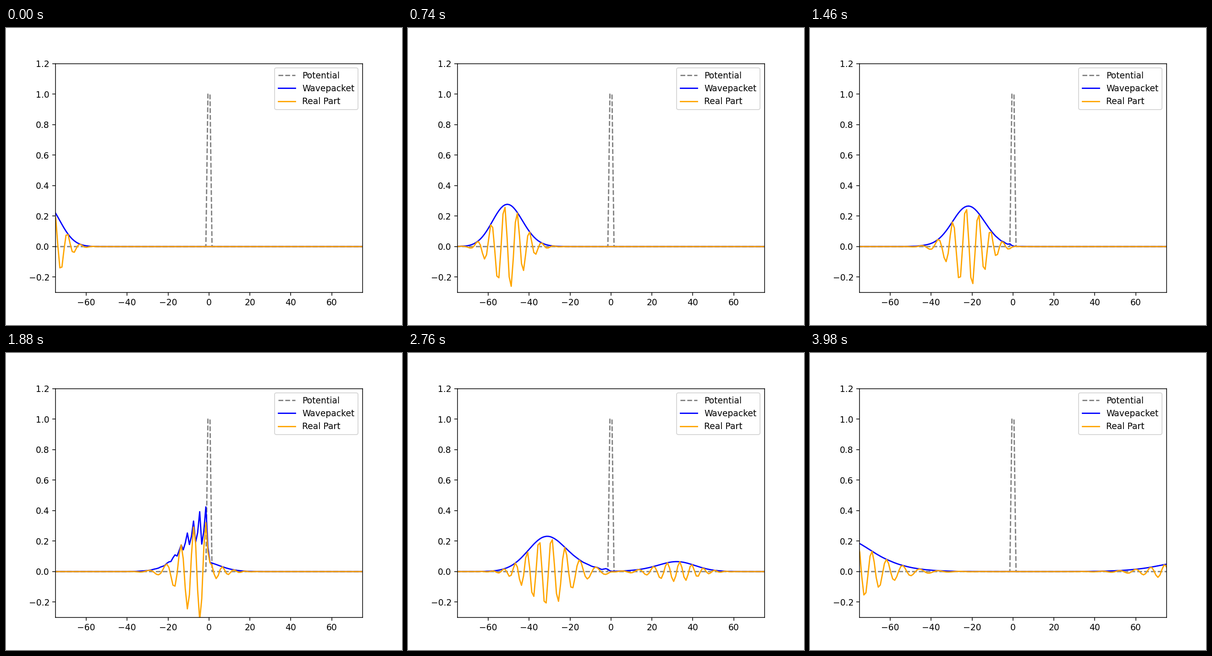
Recreate the animation shown at these times as a matplotlib script. Size 864 px wide and 648 px high, loop 4 s.

```python
import numpy as np
import matplotlib.pyplot as plt
from matplotlib.animation import FuncAnimation

N_FRAMES = 200
INTERVAL = 20  # ms
DT = 1.0
DX = 1.0  # lattice step of the Hamiltonian

# Grid and square barrier
N = 200
x = np.linspace(-100, 100, N)
potential = np.where(np.abs(x) < 1, 1.0, 0.0)


def gaussian_packet(center, sigma, k):
    norm = (2 * np.pi * sigma**2) ** -0.25
    return norm * np.exp(-((x - center) ** 2) / (4 * sigma**2) + 1j * k * x)


def crank_nicolson_step():
    """Matrix that advances the wave function by one time step."""
    hop = np.eye(N, k=1) + np.eye(N, k=-1)
    hamiltonian = (np.eye(N) - hop / 2) / DX**2 + np.diag(potential)
    half = 0.5j * DT * hamiltonian
    return np.linalg.solve(np.eye(N) + half, np.eye(N) - half)


def evolve(psi, count):
    step = crank_nicolson_step()
    states = [psi]
    for _ in range(count - 1):
        states.append(step @ states[-1])
    return states


states = evolve(gaussian_packet(center=-80, sigma=5, k=1), N_FRAMES)

fig, ax = plt.subplots(figsize=(6.4, 4.8), dpi=135)
ax.set_xlim(-75, 75)
ax.set_ylim(-0.3, 1.2)
ax.plot(x, potential, "--", color="gray", label="Potential")
(envelope,) = ax.plot(x, np.abs(states[0]), color="blue", label="Wavepacket")
(real_part,) = ax.plot(x, states[0].real, color="orange", label="Real Part")
ax.legend(loc="upper right")


def update(i):
    envelope.set_ydata(np.abs(states[i]))
    real_part.set_ydata(states[i].real)
    return envelope, real_part


anim = FuncAnimation(fig, update, frames=N_FRAMES, interval=INTERVAL,
                     repeat=True, repeat_delay=0)
plt.show()
```
